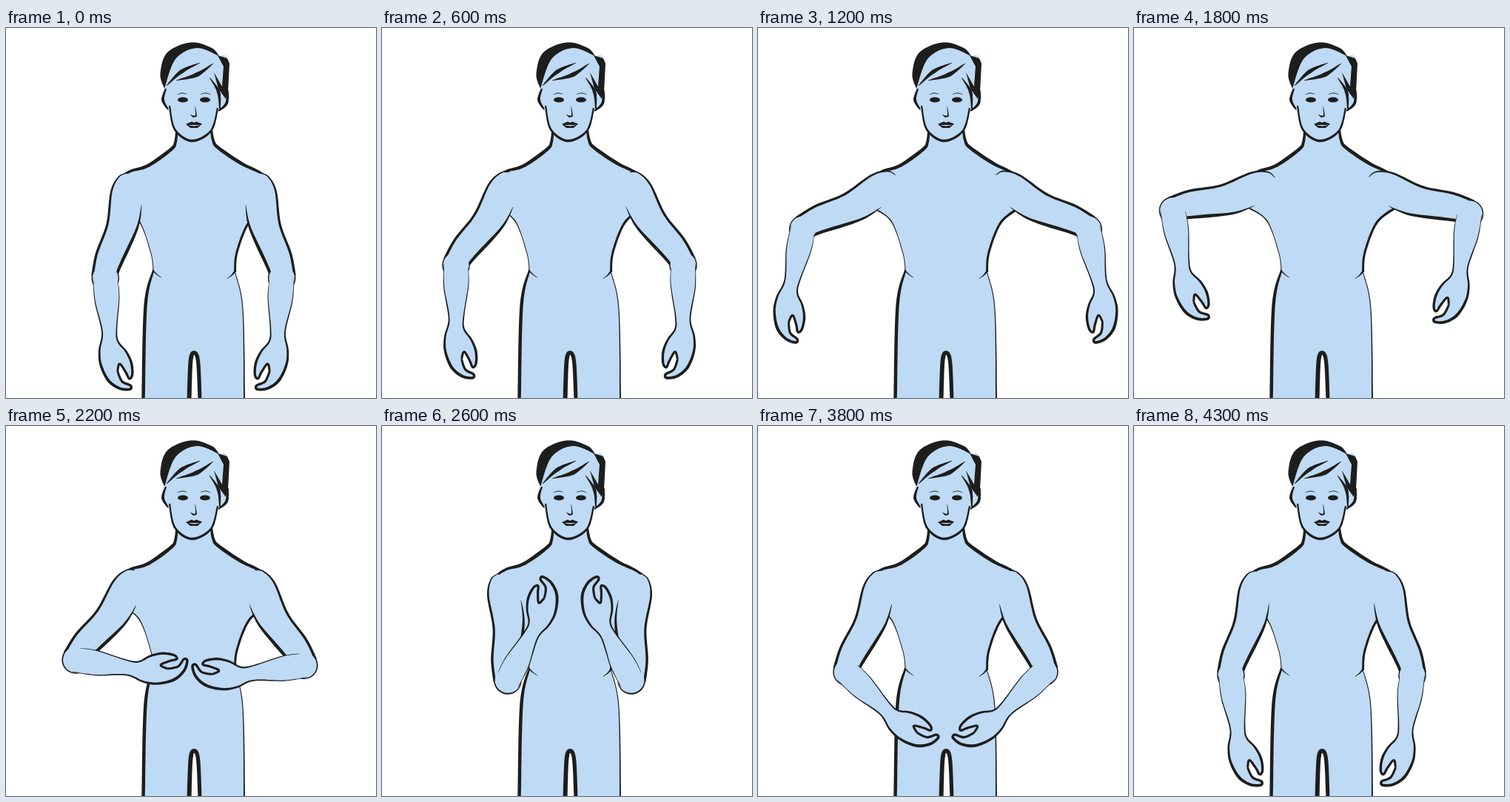
Write an HTML page that moves like this. It is 500 by 500 pixels and loops after 4400 ms.

```html
<!DOCTYPE html>
<html lang="en">
<head>
<meta charset="utf-8">
<title>Arm movement</title>
<style>
html, body { margin: 0; width: 100%; height: 100%; overflow: hidden; background: #fff; }
svg { display: block; width: 100%; height: 100%; }
</style>
</head>
<body>
<svg id="stage" viewBox="0 0 500 500"></svg>
<script>
const SKIN = '#bedaf5', INK = '#1d1d1b';
const LOOP = 4400, STEP = 100;
const stage = document.getElementById('stage');

function add(parent, tag, attrs = {}) {
  const el = document.createElementNS('http://www.w3.org/2000/svg', tag);
  for (const k in attrs) el.setAttribute(k, attrs[k]);
  return parent.appendChild(el);
}

const parse = s => s.split(' ').map(p => p.split(',').map(Number));

// Catmull-Rom curve through "x,y x,y ..."
function curve(s, n = 8) {
  const pts = parse(s), last = pts.length - 1, out = [];
  const at = i => pts[Math.max(0, Math.min(last, i))];
  for (let i = 0; i < last; i++) {
    const [a, b, c, d] = [-1, 0, 1, 2].map(k => at(i + k));
    for (let k = 0; k < n; k++) {
      const t = k / n;
      out.push([0, 1].map(j => b[j] + .5 * t * (c[j] - a[j] + t * (2 * a[j] - 5 * b[j] + 4 * c[j] - d[j]
        + t * (3 * (b[j] - c[j]) + d[j] - a[j])))));
    }
  }
  return [...out, pts[last]];
}

const fill = (g, pts, color = SKIN) =>
  add(g, 'path', { d: 'M' + pts.map(p => p.map(v => v.toFixed(1))).join('L') + 'Z', fill: color });

// Pen line whose width runs from start over mid to end
function brush(g, pts, [start, mid, end], color = INK) {
  const left = [], right = [], last = pts.length - 1;
  pts.forEach(([x, y], i) => {
    const a = pts[Math.max(0, i - 1)], b = pts[Math.min(last, i + 1)], t = 2 * i / last;
    const w = t < 1 ? start + (mid - start) * t : mid + (end - mid) * (t - 1);
    const dx = b[0] - a[0], dy = b[1] - a[1], k = w / 2 / (Math.hypot(dx, dy) || 1);
    left.push([x - dy * k, y + dx * k]);
    right.unshift([x + dy * k, y - dx * k]);
  });
  fill(g, [...left, ...right], color);
}
const line = (g, s, w, color) => brush(g, curve(s), w, color);
const back = pts => [...pts].reverse();

function drawTorso(g) {
  const shoulderL = curve('231,136 229,154 223,164 192,186 168,193.5 153,203');
  const shoulderR = curve('277,134 280,152 287,162 318,183 340,193.5 355,203');
  const flankL = curve('155,243 180,261 196,305 199,328');
  const flankR = curve('353,243 328,263 312,303 309.5,330');
  const hipL = curve('199,328 188.5,375 185.5,503');
  const hipR = curve('309.5,330 320,380 322,503');
  const crotch = curve('247.5,503 249.5,450 254,439 259.5,450 262,503');
  fill(g, [...shoulderL, ...flankL, ...hipL, ...crotch, ...back(hipR), ...back(flankR), ...back(shoulderR)]);
  brush(g, shoulderL, [3, 5, 2.5]);
  brush(g, shoulderR, [3, 5, 2.5]);
  brush(g, flankL, [2, 1, 1]);
  brush(g, flankR, [3.5, 3, 3]);
  brush(g, hipL, [2.5, 4.5, 4.5]);
  brush(g, hipR, [1, 1.2, 2]);
  brush(g, crotch, [6, 5.5, 5]);
  line(g, '198,327 204,333 211,338', [2, 1.2, .3]);
  line(g, '310,328 305,334 298,339', [3, 1.5, .3]);
}

function drawHead(g) {
  const crown = '214,82 208.5,62 218,33 250,19.5 278,27 288,38';
  fill(g, [...curve(crown), ...curve('288,38 299,42 299,95 288,112 277,139 251,153 228,137 219,110 211,98 214,82')]);
  // hair
  fill(g, [...curve(crown), ...curve('288,38 258,27 229,42 214,82')], INK);
  fill(g, parse('286,37 299,41 302,48 300,86 297,96 287,82 281,60 292,79 294,52'), INK);
  line(g, '217,78 237,59 262,47', [.5, 5.5, .4]);
  line(g, '230,71 258,63 280,48', [.5, 6, .4]);
  line(g, '275,67 287,86 289,110', [.5, 4.5, 1.5]);
  // ears and jaw
  line(g, '216,82 212,97 219,110', [2, 4, 2]);
  line(g, '299.5,84 298,102 287,112', [2.5, 4, 2]);
  line(g, '221,105 228,137 251,152.5 277,139 286,108', [2, 3.5, 2]);
  // face
  line(g, '231,90 238,88 245,89.5', [.3, 1, .3]);
  line(g, '262,89.5 270,88 277,90', [.3, 1, .3]);
  for (const cx of [239, 269]) add(g, 'ellipse', { cx, cy: 97, rx: 7, ry: 3.6, fill: INK });
  line(g, '255.5,106 256.5,113 257,119', [.4, 1.2, 2]);
  line(g, '249.5,117 253,119.5 257.5,119', [.5, 2.4, 1.5]);
  fill(g, parse('243,130 251,126.5 254,128 257,126.5 265,129.5 259,135 249,135'), INK);
  line(g, '247,131 254,131.8 262,131', [.3, 1.4, .3], SKIN);
}

// One arm; x grows towards the body, shoulder and elbow are the pivots
const SHOULDER = [172, 222], ELBOW = 122;

function makeArm(parent) {
  const upper = add(parent, 'g');
  add(upper, 'circle', { cy: ELBOW, r: 18.8, fill: INK });
  const outer = curve('-16,-22 -25,-14 -28.5,8 -20,52 -21.5,94 -17.5,124');
  const inner = curve('16,13 20,45 13.5,104 15,119');
  fill(upper, [...outer, ...back(inner)]);
  brush(upper, outer, [.8, 3, 3.6]);
  brush(upper, inner, [.4, 4.5, 3]);

  const fore = add(upper, 'g');
  add(fore, 'circle', { r: 17.4, fill: SKIN });
  const finger = curve('-16.5,-2 -16.5,30 -10,72 -15.5,96 -15.5,116 -7,138 7,150 21,152.5 22.5,147.5 11.5,141 6.5,127');
  const thumb = curve('6.5,127 10,117 17,128 21.5,138 26,133 26,117 20,101 10,86 10,68 16.5,28 16.5,4');
  fill(fore, [...finger, ...thumb]);
  brush(fore, finger, [.5, 4, 3]);
  brush(fore, thumb, [3, 3.4, .4]);

  return (up, low) => {
    const reach = 1 - .04 * Math.abs(low) / 157;
    upper.setAttribute('transform', `translate(${SHOULDER}) rotate(${up})`);
    fore.setAttribute('transform', `translate(0 ${ELBOW}) rotate(${low - up}) scale(1 ${reach})`);
  };
}

const { sin, PI } = Math;
const phase = (n, from, to) => Math.max(0, Math.min(1, (n - from) / (to - from)));
const mix = (a, b, t) => a + (b - a) * t;

// Angles of upper arm and forearm from straight down, outwards positive
function pose(n) {
  const lift = phase(n, 4, 13), fold = phase(n, 17, 26), drop = phase(n, 30, 44);
  if (drop) return {
    up: mix(1, 18, drop) + 16 * sin(PI * drop ** .8),
    low: mix(-4.5, -153, (1 - drop) ** 1.5),
    lag: 0
  };
  if (fold) return { up: mix(88, 1, fold), low: mix(8, -153, fold), lag: 6 * sin(PI * fold) };
  return { up: mix(18, 70, lift ** .7), low: mix(-4.5, 3, lift) + 15.5 * sin(PI * lift ** 2), lag: 0 };
}

const body = add(stage, 'g');
drawTorso(body);
drawHead(body);
const leftArm = makeArm(add(stage, 'g'));
const rightArm = makeArm(add(stage, 'g', { transform: 'translate(507 0) scale(-1 1)' }));

function render(ms) {
  const { up, low, lag } = pose(Math.floor(ms % LOOP / STEP));
  leftArm(up, low);
  rightArm(up - lag, low);
}

function tick() {
  render(performance.now());
  requestAnimationFrame(tick);
}
tick();
</script>
</body>
</html>
```
